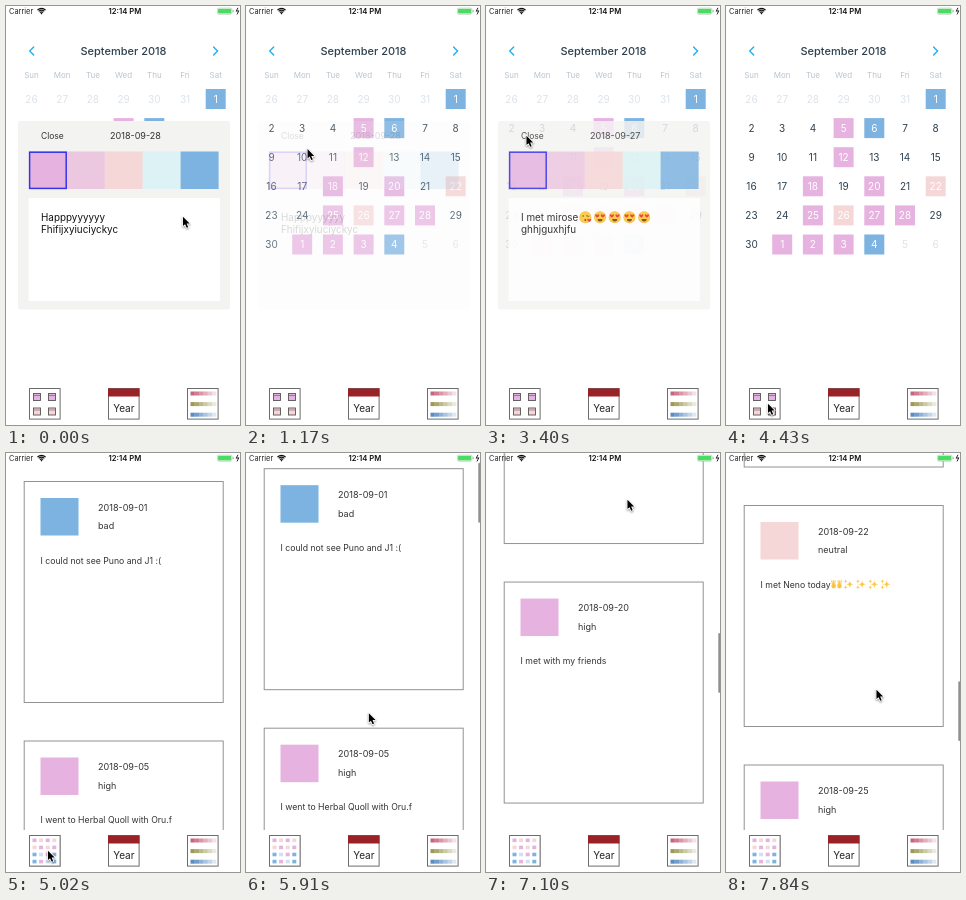
These frames come from a looping animation (234 px wide and 419 px high, 7.99 s). An HTML page with a canvas:

```html
<!DOCTYPE html>
<html lang="en">
<head>
<meta charset="utf-8">
<title>Mood calendar</title>
<style>
  html, body { margin: 0; width: 100%; height: 100%; overflow: hidden; background: #fff; }
  canvas { display: block; width: 100vw; height: 100vh; }
</style>
</head>
<body>
<canvas id="stage"></canvas>
<script>
const W = 234, H = 419, LOOP = 7990, TICKS = 54, TICK = LOOP / TICKS;
const canvas = document.getElementById('stage');
const ctx = canvas.getContext('2d');

const PINK = '#e6b3e0', ROSE = '#ecc8e0', PEACH = '#f6d7d8', TEAL = '#dcf2f5', BLUE = '#7db3e0';
const INK = '#333', DAY = '#2d4150', FADED = '#dce3e9';
const MOOD = { high: PINK, neutral: PEACH, bad: BLUE };

const ENTRIES = [
  { day: 1, mood: 'bad', note: 'I could not see Puno and J1 :(' },
  { day: 5, mood: 'high', note: 'I went to Herbal Quoll with Oru.f' },
  { day: 6, mood: 'bad', note: 'It rained all day' },
  { day: 12, mood: 'high', note: 'I had a good lunch' },
  { day: 18, mood: 'high', note: 'I was happy today' },
  { day: 20, mood: 'high', note: 'I met with my friends' },
  { day: 22, mood: 'neutral', note: 'I met Neno today', emoji: [hands, sparkles, sparkles, sparkles, sparkles] },
  { day: 25, mood: 'high', note: 'It was a nice day' },
  { day: 26, mood: 'neutral', note: 'I stayed at home' },
  { day: 27, mood: 'high', note: 'I met mirose' },
  { day: 28, mood: 'high', note: 'Happpyyyyyy' }
];
const dateOf = day => `2018-09-${String(day).padStart(2, '0')}`;

// Eased progress from 0 to 1 between two ticks.
function ramp(t, from, to) {
  const p = Math.min(1, Math.max(0, (t - from) / (to - from)));
  return p * p * (3 - 2 * p);
}

// Pointer moves: first tick, last tick, destination.
const MOVES = [
  [0, 5, 45, 130],
  [7, 11, 148, 209],
  [13, 17, 59, 172],
  [17, 20, 40, 129],
  [24, 30, 41.5, 397],
  [35, 37, 119, 324],
  [39, 42, 132, 75],
  [42, 46, 141, 244],
  [47, 48, 141, 46],
  [49, 53, 150, 236]
];

function pointerAt(t) {
  let x = 176.5, y = 210;
  for (const [from, to, toX, toY] of MOVES) {
    const p = ramp(t, from, to);
    x += (toX - x) * p;
    y += (toY - y) * p;
  }
  return [x, y];
}

const modalAlpha = t => 1 - ramp(t, 5, 9) + ramp(t, 12, 16) - ramp(t, 22, 26);

// One long swipe, then a flick that slows down.
function scrollAt(t) {
  const flick = Math.min(1, Math.max(0, (t - 47) / 6));
  return 1000 * ramp(t, 39.57, 46) + 533 * (1 - (1 - flick) ** 2.53);
}

function box(x, y, w, h, color) {
  ctx.fillStyle = color;
  ctx.fillRect(x, y, w, h);
}

function frame(x, y, w, h, color, width = 1) {
  ctx.strokeStyle = color;
  ctx.lineWidth = width;
  ctx.strokeRect(x, y, w, h);
}

function round(x, y, w, h, r, color) {
  ctx.fillStyle = color;
  ctx.beginPath();
  ctx.roundRect(x, y, w, h, r);
  ctx.fill();
}

function disc(x, y, r, color) {
  ctx.fillStyle = color;
  ctx.beginPath();
  ctx.arc(x, y, r, 0, 7);
  ctx.fill();
}

function line(points, color, width) {
  ctx.strokeStyle = color;
  ctx.lineWidth = width;
  ctx.beginPath();
  points.forEach(([x, y]) => ctx.lineTo(x, y));
  ctx.stroke();
}

// Text is placed by the vertical centre of its capitals; returns the right edge.
function text(s, x, y, size, color = INK, align = 'left', weight = 400) {
  ctx.font = `${weight} ${size}px Inter, sans-serif`;
  ctx.fillStyle = color;
  ctx.textAlign = align;
  ctx.fillText(s, x, y + size * 0.36);
  return x + ctx.measureText(s).width;
}

function faded(alpha, draw) {
  if (alpha <= 0) return;
  ctx.save();
  ctx.globalAlpha = alpha;
  draw();
  ctx.restore();
}

function heart(x, y, r) {
  ctx.fillStyle = '#e8303c';
  ctx.beginPath();
  ctx.moveTo(x, y + r);
  for (const side of [-1, 1]) {
    const endY = side < 0 ? y - r * 0.4 : y + r;
    const [a, b] = side < 0 ? [[-2, -0.3], [-0.8, -1.5]] : [[0.8, -1.5], [2, -0.3]];
    ctx.bezierCurveTo(x + a[0] * r, y + a[1] * r, x + b[0] * r, y + b[1] * r, x, endY);
  }
  ctx.fill();
}

function face(x, y) {
  disc(x, y, 6, '#f2b53a');
  disc(x, y - 0.4, 5.4, '#fbd04f');
}

function kiss(x, y) {
  face(x, y);
  disc(x - 2.2, y - 1.3, 0.8, '#6b4216');
  line([[x + 1.2, y - 1.5], [x + 3.4, y - 1]], '#6b4216', 0.9);
  disc(x, y + 2.6, 1, '#6b4216');
  heart(x + 4, y + 3, 1.8);
}

function loveEyes(x, y) {
  face(x, y);
  heart(x - 2.8, y - 1.4, 1.9);
  heart(x + 2.8, y - 1.4, 1.9);
  ctx.fillStyle = '#7a3d18';
  ctx.beginPath();
  ctx.arc(x, y + 1.6, 2.5, 0, Math.PI);
  ctx.fill();
}

function hands(x, y) {
  for (const side of [-1, 1]) {
    disc(x + side * 2.9, y + 1.8, 2.3, '#f8c544');
    for (const i of [-1, 0, 1])
      line([[x + side * 2.9 + i, y + 1], [x + side * 3.2 + i * 1.7, y - 4]], '#f8c544', 1);
  }
}

function star(x, y, r) {
  ctx.fillStyle = '#fbc94c';
  ctx.beginPath();
  ctx.moveTo(x + r, y);
  for (let i = 1; i <= 4; i++)
    ctx.quadraticCurveTo(x, y, x + r * Math.cos(i * Math.PI / 2), y + r * Math.sin(i * Math.PI / 2));
  ctx.fill();
}

function sparkles(x, y) {
  star(x + 1, y, 4.4);
  star(x - 3.2, y - 3, 2.2);
  star(x - 3.2, y + 3, 2.2);
}

function statusBar() {
  text('Carrier', 3, 5, 7.4, '#222');
  text('12:14 PM', 119, 5, 7.7, '#111', 'center', 600);
  ctx.lineCap = 'butt';
  for (const r of [2.2, 4, 5.8]) {
    ctx.strokeStyle = '#111';
    ctx.lineWidth = 1.2;
    ctx.beginPath();
    ctx.arc(35.5, 8.2, r, -Math.PI * 0.75, -Math.PI * 0.25);
    ctx.stroke();
  }
  disc(35.5, 7.6, 0.8, '#111');
  round(211, 1.8, 15.4, 6.6, 1.8, '#b5bdb6');
  round(211.5, 2.3, 14.4, 5.6, 1.4, '#fff');
  round(212, 2.7, 13.4, 4.8, 1, '#4cd964');
  round(226.8, 4, 0.9, 2.2, 0.4, '#aaa');
  line([[232, 1.8], [230.2, 5.2], [232.8, 4.8], [231, 8.4]], '#222', 1);
}

function calendar() {
  ctx.lineCap = 'round';
  for (const [x, dir] of [[23.7, 1], [211.6, -1]])
    line([[x + 4 * dir, 41], [x, 45], [x + 4 * dir, 49]], '#1fb0f2', 1.4);
  text('September 2018', 117.5, 45, 11, DAY, 'center', 500);
  const colX = c => 25.5 + 30.7 * c;
  'Sun Mon Tue Wed Thu Fri Sat'.split(' ').forEach((name, c) =>
    text(name, colX(c), 69, 8, '#b9c4cf', 'center'));
  for (let i = 0; i < 42; i++) {
    const date = new Date(2018, 7, 26 + i), day = date.getDate(), month = date.getMonth();
    const entry = month === 8 && ENTRIES.find(e => e.day === day);
    const october = month === 9 && day < 5 && (day < 4 ? PINK : BLUE);
    const color = entry ? MOOD[entry.mood] : october;
    const x = colX(i % 7), y = 93 + 29.1 * Math.floor(i / 7);
    if (color) box(x - 10, y - 10, 20, 20, color);
    text(day, x, y, 10, color ? '#fff' : month === 8 ? DAY : FADED, 'center');
  }
}

function modal(day, lines, emoji = []) {
  round(12, 115, 212, 188.5, 2, '#f3f3f2');
  text('Close', 35, 130, 8.5);
  text(dateOf(day), 104, 130, 9.05);
  [PINK, ROSE, PEACH, TEAL, BLUE].forEach((c, i) => box(23 + 37.9 * i, 145.5, 38, 37.5, c));
  frame(23.6, 146.2, 36.6, 36.2, '#3434ea', 1.5);
  box(22.5, 192, 191.5, 103, '#fff');
  const [right] = lines.map((s, i) => text(s, 35, 211.5 + 12 * i, 9.9, '#111'));
  emoji.forEach((draw, i) => draw(right + 7 + 14.7 * i, 211.3));
}

function list(scroll, scrolling) {
  ctx.save();
  ctx.beginPath();
  ctx.rect(0, 0, W, 377);
  ctx.clip();
  box(0, 0, W, 377, '#fff');
  ENTRIES.forEach(({ day, mood, note, emoji = [] }, i) => {
    const y = 28.5 + 259.5 * i - scroll;
    if (y > 380 || y < -225) return;
    frame(18.2, y, 199, 221, '#929292');
    box(34.5, y + 16.5, 38, 37.5, MOOD[mood]);
    text(dateOf(day), 92, y + 26, 9.05);
    text(mood, 92, y + 44.7, 9);
    const right = text(note, 34.5, y + 79, 8.7);
    emoji.forEach((draw, n) => draw(right + 6 + 12.3 * n, y + 78.8));
  });
  if (scrolling) round(232.3, 8 + scroll * 0.1436, 1.7, 60, 0.8, '#8f8f8f');
  ctx.restore();
}

function tab(x) {
  box(x, 382, 31.5, 31.5, '#fff');
  frame(x + 0.5, 382.5, 30.6, 30.6, '#6c6c6c');
}

function entriesIcon() {
  tab(23);
  for (let i = 0; i < 4; i++) {
    const x = 27.5 + (i % 2) * 15, y = 387.5 + (i >> 1) * 14.5;
    box(x, y, 7, 7, i < 2 ? PINK : PEACH);
    frame(x, y, 7, 7, '#555', 0.9);
    line([[x, y + 2], [x + 7, y + 2]], '#8a5670', 0.7);
  }
}

function monthIcon() {
  tab(23);
  for (let row = 0; row < 4; row++)
    for (let col = 0; col < 4; col++) {
      const edge = col % 3 === 0;
      const color = row < 2 ? (row + col) % 2 ? PEACH : PINK : edge ? BLUE : col + row === 4 ? PINK : '#cfe0f4';
      box(26.5 + col * 6.6, 385.5 + row * 7.1, 4, 3.6, color);
    }
}

function tabs(listAlpha) {
  box(0, 377, W, H - 377, '#fff');
  entriesIcon();
  faded(listAlpha, monthIcon);
  tab(102);
  box(102, 382.5, 31.5, 8, '#992226');
  text('Year', 117.8, 402, 10, '#222', 'center');
  tab(181);
  ['#c9647c', '#9a9a55', '#5b8cc4'].forEach((color, row) => {
    for (let i = 0; i < 6; i++)
      faded(1 - i * 0.16, () => box(184.5 + i * 4.3, 385.5 + row * 10.6, 4.3, 4, color));
  });
}

function pointer([x, y]) {
  ctx.save();
  ctx.translate(x, y);
  ctx.scale(0.92, 0.92);
  ctx.beginPath();
  for (const [dx, dy] of [[0.5, 0.8], [0.5, 11], [2.8, 8.9], [4.6, 12.8], [6.2, 12.1], [4.5, 8.2], [7.8, 8.2]])
    ctx.lineTo(dx, dy);
  ctx.closePath();
  ctx.lineJoin = 'round';
  ctx.strokeStyle = '#fff';
  ctx.lineWidth = 1.8;
  ctx.shadowColor = 'rgba(0, 0, 0, 0.4)';
  ctx.shadowBlur = 2;
  ctx.shadowOffsetY = 1;
  ctx.stroke();
  ctx.shadowColor = 'transparent';
  ctx.fillStyle = '#000';
  ctx.fill();
  ctx.restore();
}

function resize() {
  const dpr = window.devicePixelRatio || 1;
  const w = Math.round(innerWidth * dpr), h = Math.round(innerHeight * dpr);
  if (canvas.width !== w || canvas.height !== h) {
    canvas.width = w;
    canvas.height = h;
  }
  ctx.setTransform(w / W, 0, 0, h / H, 0, 0);
}

const start = performance.now();

function render() {
  const time = Math.max(0, performance.now() - start) % LOOP;
  const tick = Math.min(TICKS - 1, Math.floor((time + 15) / TICK));
  const listAlpha = ramp(tick, 31, 34);
  resize();
  box(0, 0, W, H, '#fff');
  if (listAlpha < 1) {
    calendar();
    faded(modalAlpha(tick), () => tick < 12
      ? modal(28, ['Happpyyyyyy', 'Fhifijxyiuciyckyc'])
      : modal(27, ['I met mirose', 'ghhjguxhjfu'], [kiss, loveEyes, loveEyes, loveEyes, loveEyes]));
  }
  faded(listAlpha, () => list(scrollAt(tick), tick >= 40));
  tabs(listAlpha);
  statusBar();
  pointer(pointerAt(tick));
  requestAnimationFrame(render);
}
render();
</script>
</body>
</html>
```
